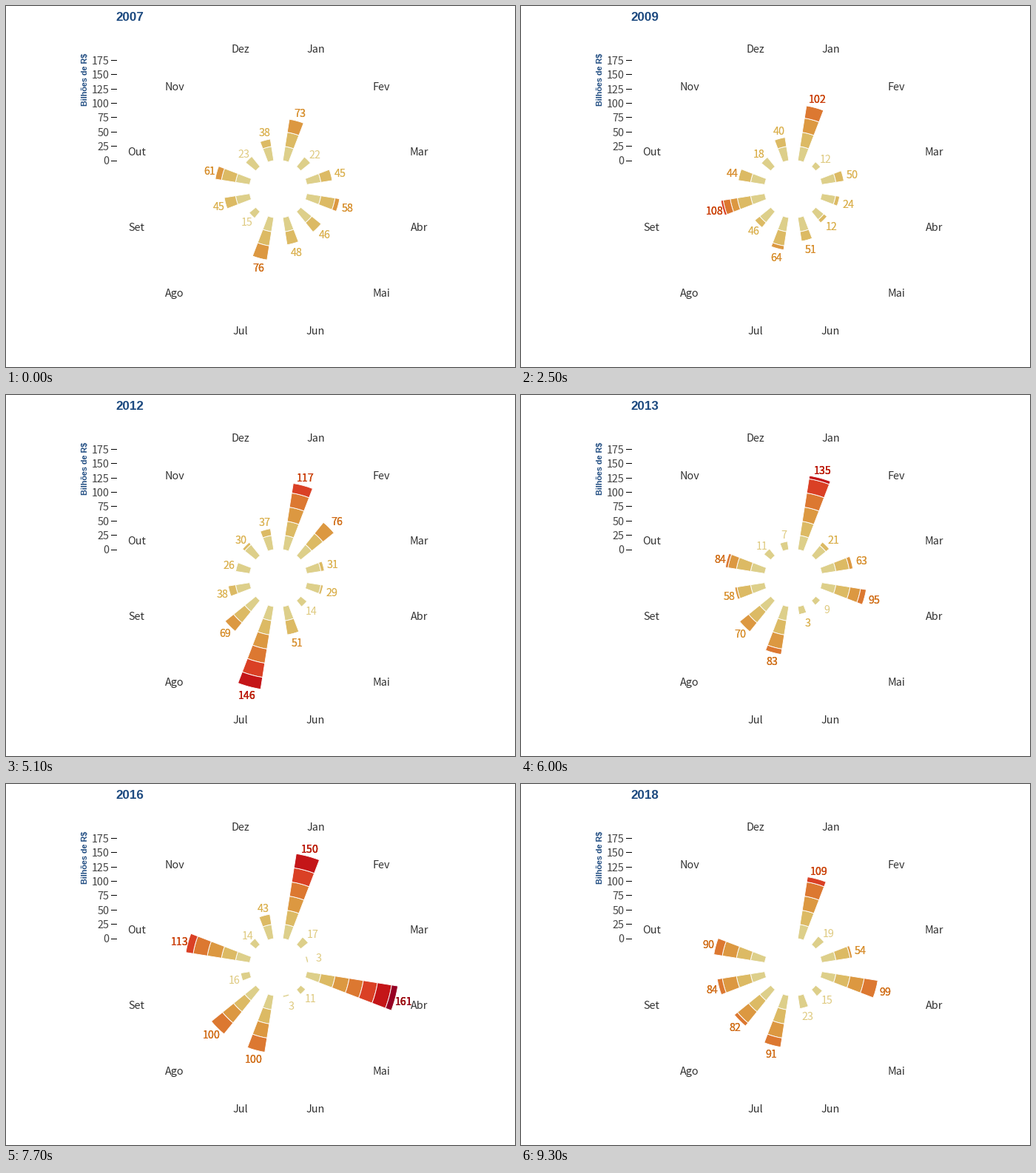
Animation, 688 px wide and 488 px high, one loop 10 s. Source, as a matplotlib script:

```python
import matplotlib.pyplot as plt
import numpy as np
from matplotlib.animation import FuncAnimation
from matplotlib.patches import Wedge

W, H, DPI = 688, 488, 100
CX, CY = 368, 247.5
INNER, SCALE = 39, 135.5 / 175      # hole radius, pixels per unit
BAND, HALF = 25, 6                  # units per colour band, half bar angle
FRAMES, STEP = 100, 100

MONTHS = "Jan Fev Mar Abr Mai Jun Jul Ago Set Out Nov Dez".split()
FILLS = ["#ddcf8a", "#dcba64", "#dc9841", "#dc7831", "#da4025", "#c41518", "#960024"]
INKS = ["#dfca80", "#dbae4a", "#d98a2e", "#d2691e", "#cc3a14", "#b80e14", "#8c0020"]
NAVY = "#1d4a80"

FIRST_YEAR = 2007
VALUES = np.array([
    [73, 22, 45, 58, 46, 48, 76, 15, 45, 61, 23, 38],
    [65, 25, 40, 75, 17, 30, 91, 14, 30, 32, 13, 34],
    [94, 10, 28, 39, 39, 34, 50, 26, 47, 51, 27, 42],
    [102, 12, 50, 24, 12, 51, 64, 46, 108, 44, 18, 40],
    [118, 12, 42, 27, 50, 28, 128, 11, 12, 39, 34, 26],
    [117, 76, 31, 29, 14, 51, 146, 69, 38, 26, 30, 37],
    [126, 40, 47, 62, 12, 27, 86, 70, 48, 55, 20, 22],
    [135, 21, 63, 95, 9, 3, 83, 70, 58, 84, 11, 7],
    [123, 17, 77, 113, 73, 3, 71, 21, 62, 149, 12, 8],
    [150, 17, 3, 161, 11, 3, 100, 100, 16, 113, 14, 43],
    [128, 18, 30, 90, 13, 14, 99, 90, 50, 100, 16, 30],
    [109, 19, 54, 99, 15, 23, 91, 82, 84, 90, 0, 0],
])
# first frame and number of steps of each change of year
STARTS = [7, 16, 25, 34, 43, 52, 60, 68, 75, 84, 92]
STEPS = [2, 2, 2, 2, 2, 2, 3, 3, 3, 3, 2]

fig = plt.figure(figsize=(W / DPI, H / DPI), dpi=DPI, facecolor="white")
ax = fig.add_axes([0, 0, 1, 1])
ax.set_xlim(0, W)
ax.set_ylim(H, 0)
ax.axis("off")


def px(n):
    return n * 72 / DPI


def put(x, y, s, size=14.4, color="#333333", ha="center", font="Noto Sans CJK JP", **kw):
    return ax.text(x, y, s, fontsize=px(size), color=color, ha=ha,
                   va=kw.pop("va", "baseline"), family=font, **kw)


def polar(month, r):
    a = np.radians(15 + 30 * month)
    return CX + r * np.sin(a), CY - r * np.cos(a)


def bands(values):
    """Split every value into its stacked colour bands."""
    lows = BAND * np.arange(len(FILLS))
    return np.clip(values[:, None] - lows, 0, BAND)


def draw_static():
    for m, name in enumerate(MONTHS):
        x, y = polar(m, 197.5)
        put(x - 0.5, y + 5.8, name)
    for v in range(0, 176, BAND):
        y = CY - INNER - v * SCALE
        ax.plot([142, 149], [y, y], color="black", lw=px(1), snap=True)
        put(139.5, y + 6, str(v), ha="right", color="#444444")
    put(107, 99.5, "Bilhões de R$", 10.8, NAVY, font="Liberation Sans",
        weight="bold", rotation=90, va="center")


def state(k):
    """Year index of the title, of the label texts, and the band sizes."""
    done = sum(s <= k for s in STARTS)
    if done == 0:
        return 0, 0, bands(VALUES[0])
    j = k - STARTS[done - 1]
    old, new = bands(VALUES[done - 1]), bands(VALUES[done])
    t = 0.5 if j == 0 else 1
    title = done if j >= STEPS[done - 1] - 1 else done - 1
    return title, done, old + (new - old) * t


draw_static()
title = put(148.5, 20.5, "", 17, NAVY, ha="left", font="Liberation Sans", weight="bold")
moving = []


def draw_bar(month, sizes, text):
    r = INNER
    mid = 15 + 30 * month - 90
    for size, fill in zip(sizes, FILLS):
        if size > 0:
            r += size * SCALE
            w = Wedge((CX, CY), r, mid - HALF, mid + HALF, width=size * SCALE,
                      facecolor=fill, edgecolor="white", lw=px(0.9))
            moving.append(ax.add_patch(w))
    x, y = polar(month, r + 11.5)
    x += 1.8 * (3 - len(text))
    # one copy of the label per band, stacked
    for size, ink in zip(sizes, INKS):
        if size > 0:
            moving.append(put(x, y + 6, text, color=ink, zorder=4))


def update(k):
    while moving:
        moving.pop().remove()
    shown, labels, sizes = state(k)
    title.set_text(str(FIRST_YEAR + shown))
    for m in range(12):
        value = VALUES[labels, m] or VALUES[labels - 1, m]
        draw_bar(m, sizes[m], str(value))
    return moving


anim = FuncAnimation(fig, update, frames=FRAMES, interval=STEP,
                     init_func=lambda: [], repeat=True, repeat_delay=0, blit=False)
plt.show()
```
